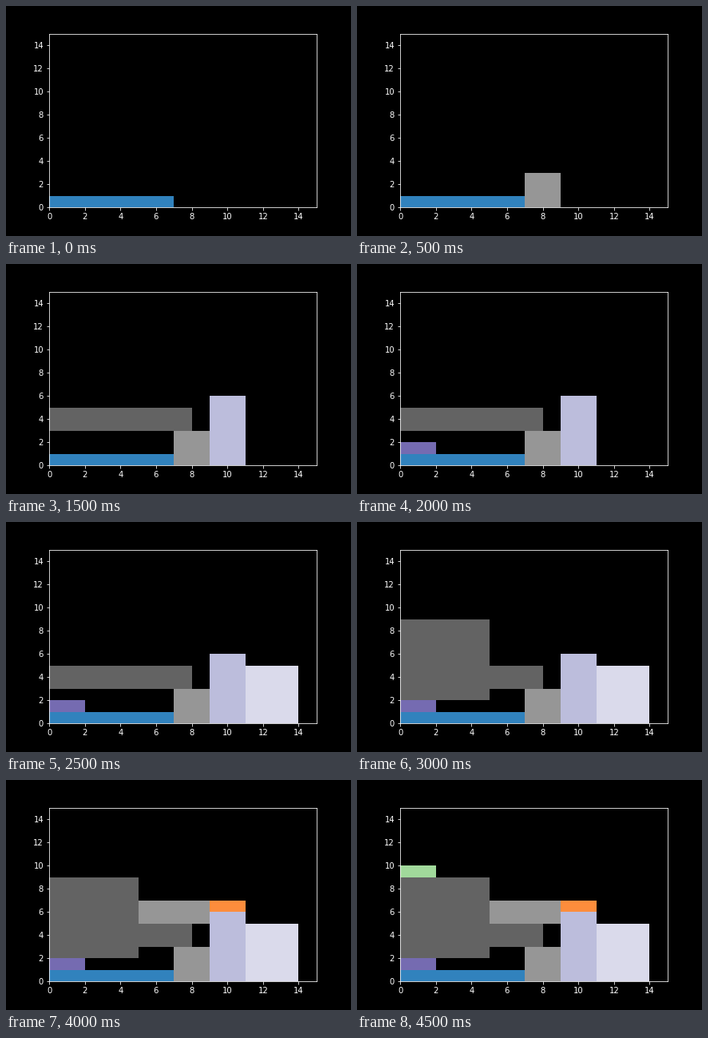
A matplotlib script that plays this animation: 432x288 px, repeating every 5000 ms.

```python
import matplotlib.pyplot as plt
from matplotlib.animation import FuncAnimation
from matplotlib.patches import Rectangle

plt.style.use("dark_background")
plt.rcParams["font.family"] = "DejaVu Sans"

SIDE = 15
STEP_MS = 500

# x, y, width, height, colour: listed in the order they are placed
BLOCKS = [
    (0, 0, 7, 1, "#3182bd"),
    (7, 0, 2, 3, "#969696"),
    (0, 3, 8, 2, "#636363"),
    (9, 0, 2, 6, "#bcbddc"),
    (0, 1, 2, 1, "#756bb1"),
    (11, 0, 3, 5, "#dadaeb"),
    (0, 2, 5, 7, "#636363"),
    (5, 5, 4, 2, "#969696"),
    (9, 6, 2, 1, "#fd8d3c"),
    (0, 9, 2, 1, "#a1d99b"),
]

fig, ax = plt.subplots(figsize=(6, 4), dpi=72)
fig.subplots_adjust(left=0.125, right=0.9, bottom=0.125, top=0.88)
ax.set(xlim=(0, SIDE), ylim=(0, SIDE),
       xticks=range(0, SIDE, 2), yticks=range(0, SIDE, 2))

patches = [
    ax.add_patch(Rectangle((x, y), w, h, facecolor=color, edgecolor="none"))
    for x, y, w, h, color in BLOCKS
]


def show_blocks(step):
    for i, patch in enumerate(patches):
        patch.set_visible(i <= step)
    return patches


anim = FuncAnimation(fig, show_blocks, frames=len(BLOCKS),
                     init_func=lambda: show_blocks(0),
                     interval=STEP_MS, repeat=True, repeat_delay=0)

plt.show()
```
